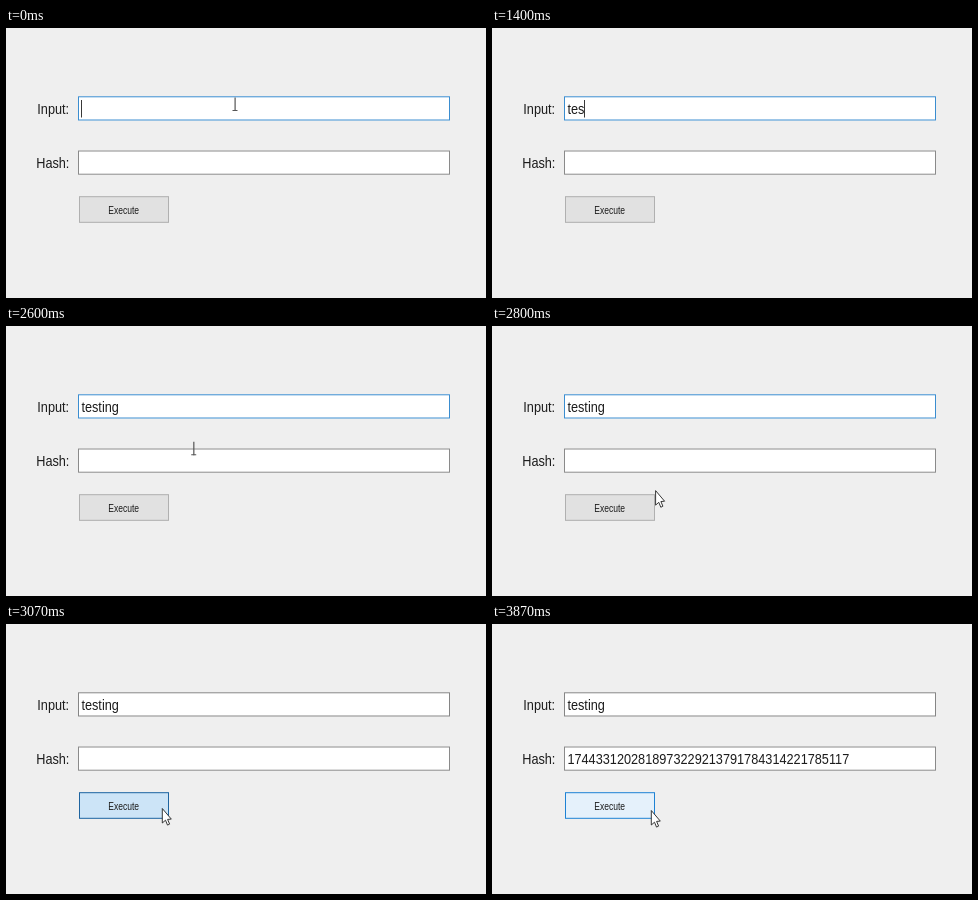
These frames come from a looping animation (480 px wide and 270 px high, 3.99 s). An HTML page with a canvas:

```html
<!DOCTYPE html>
<html lang="en">
<head>
<meta charset="utf-8">
<title>Hash form</title>
<style>
  html, body { margin: 0; width: 100%; height: 100%; overflow: hidden; background: #efefef; }
  canvas { display: block; }
</style>
</head>
<body>
<canvas id="stage" width="480" height="270"></canvas>
<script>
const ctx = document.getElementById('stage').getContext('2d');
const LOOP = 3990;
const SQUASH = 0.82;
const INK = '#1c1c1c';
const WORD = 'testing';
const HASH = '1744331202818973229213791784314221785117';
const TYPE_START = 870, TYPE_END = 1800;
const BLINK = 530, MOVE = 2330, HOVER = 2870, PRESS = 3000, RELEASE = 3200;

const STYLES = {
  idle: { fill: [225, 225, 225], edge: [176, 176, 176] },
  hover: { fill: [229, 241, 251], edge: [30, 130, 212] },
  down: { fill: [204, 228, 247], edge: [30, 100, 160] }
};

const between = (t, a, b) => t >= a && t < b;
const mix = (a, b, k) => a + (b - a) * k;
const mixColor = (a, b, k) => `rgb(${a.map((v, i) => Math.round(mix(v, b[i], k)))})`;
const progress = (t, a, b) => Math.min(1, Math.max(0, (t - a) / (b - a)));
const smooth = k => k * k * (3 - 2 * k);
const step = t => Math.floor((t + 4) * 0.015) / 0.015;

function setFont(size) {
  ctx.font = `${size}px "Liberation Sans", Arial, sans-serif`;
}

function text(str, x, y, size) {
  ctx.save();
  ctx.translate(x, y);
  ctx.scale(SQUASH, 1);
  setFont(size);
  ctx.fillStyle = INK;
  ctx.fillText(str, 0, 0);
  ctx.restore();
}

function box(x, y, w, h, fill, border) {
  ctx.fillStyle = fill;
  ctx.fillRect(x, y, w, h);
  ctx.strokeStyle = border;
  ctx.lineWidth = 1;
  ctx.strokeRect(x + 0.5, y + 0.5, w - 1, h - 1);
}

// quick at both ends of the word, slower in the middle
function typedText(t) {
  const last = WORD.length - 1;
  const keyTime = i => mix(TYPE_START, TYPE_END, i / last) + 110 * Math.sin(Math.PI * i / last) ** 2;
  return [...WORD].filter((_, i) => keyTime(i) <= t).join('');
}

function caret(t, typed) {
  const on = t < 470 || between(t, TYPE_START, TYPE_END + BLINK) || between(t, HOVER, PRESS);
  if (!on) return;
  setFont(15.5);
  const x = 75 + Math.round(ctx.measureText(typed).width * SQUASH + 0.3);
  ctx.fillStyle = '#383838';
  ctx.fillRect(x, 72, 1, 17.5);
}

function button(t) {
  let from = STYLES.idle, to = STYLES.hover, k = progress(step(t), 2800, PRESS);
  if (t >= PRESS) {
    from = STYLES.down;
    k = progress(step(t), RELEASE - 66, 3330);
  }
  if (between(t, PRESS, RELEASE)) k = 0;
  box(73, 168.2, 90, 26.6, mixColor(from.fill, to.fill, k), mixColor(from.edge, to.edge, k));
  text('Execute', 102.3, 186, 10.4);
}

function arrow(x, y) {
  const shape = [[0, 0], [0, 14.5], [3.2, 11.7], [5.2, 16.6], [7.3, 15.6], [5.3, 10.9], [9, 10.6]];
  ctx.beginPath();
  shape.forEach(([dx, dy]) => ctx.lineTo(x + 0.3 + dx, y + 0.5 + dy));
  ctx.closePath();
  ctx.fillStyle = '#fff';
  ctx.fill();
  ctx.strokeStyle = '#222';
  ctx.lineWidth = 0.9;
  ctx.stroke();
}

function beam(x, y) {
  ctx.fillStyle = '#555';
  ctx.fillRect(x - 0.5, y - 6.5, 1.2, 13.5);
  ctx.fillRect(x - 2.5, y + 6, 5, 1);
}

// one curved sweep to the button, then a small nudge
function pointer(t) {
  if (between(t, TYPE_START, MOVE)) return; // hidden while typing
  const sweep = smooth(progress(step(t), 2270, PRESS));
  const nudge = progress(step(t), 3734, 3866);
  const x = mix(229, 156, sweep * (1 + 0.56 * (1 - sweep))) + 3 * nudge;
  const y = mix(76, 184, sweep) + 2 * nudge;
  const overField = between(y, 68, 92) || between(y, 122, 146);
  (overField ? beam : arrow)(x, y);
}

function draw(t) {
  const typed = typedText(t);
  ctx.fillStyle = '#efefef';
  ctx.fillRect(0, 0, 480, 270);
  text('Input:', 31.3, 86, 15.5);
  text('Hash:', 30.2, 140, 15.5);
  box(72, 68.3, 372, 24.2, '#fff', t < PRESS ? '#3a8dd0' : '#858585');
  box(72, 122.5, 372, 24.2, '#fff', '#8a8a8a');
  text(typed, 75.4, 86, 15.5);
  if (t >= RELEASE) text(HASH, 75.4, 140, 15.5);
  caret(t, typed);
  button(t);
  pointer(t);
}

const start = performance.now();
function frame() {
  draw((performance.now() - start) % LOOP);
  requestAnimationFrame(frame);
}
frame();
</script>
</body>
</html>
```
